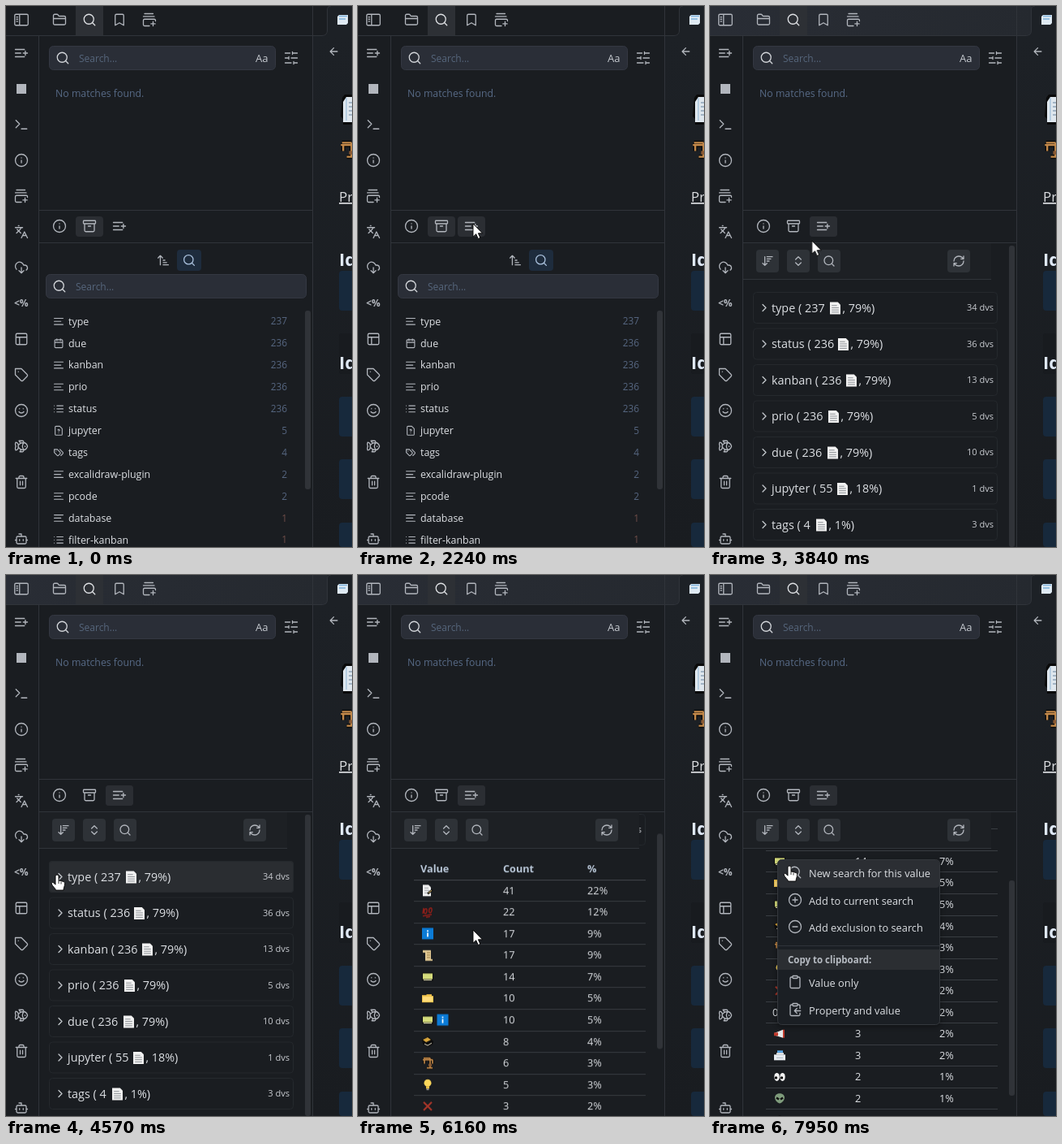
Write an HTML page that moves like this. It is 427 by 666 pixels and loops after 8000 ms.

```html
<!DOCTYPE html>
<html lang="en">
<head>
<meta charset="utf-8">
<title>Better Properties</title>
<style>
html, body { margin: 0; width: 100%; height: 100%; overflow: hidden; background: #1a1d21; }
svg { display: block; }
text { font-family: "Open Sans", "Noto Sans", sans-serif; white-space: pre; }
.i { fill: none; stroke-linecap: round; stroke-linejoin: round; }

.step, .ease { animation: 8s infinite; animation-delay: -10ms; }
.step { animation-timing-function: step-end; }
.ease { animation-timing-function: linear; }

#focus { animation-name: focus; }
#ribbonHover { animation-name: ribbonHover; }
#tip1 { animation-name: tip1; }
#tabHover { animation-name: tabHover; }
#tip2 { animation-name: tip2; }
#oldPane { animation-name: oldPane; }
#newPane { animation-name: newPane; }
#cards { animation-name: cards; }
#cardHover { animation-name: cardHover; }
#table { animation-name: tableOn; }
#scroll { animation-name: scroll; }
#thumb { animation-name: thumb; }
#click1 { animation-name: click1; }
#click2 { animation-name: click2; }
#menu { animation-name: menu; }
#itemHover { animation-name: itemHover; }
#pointer { animation-name: move; }
#arrow { animation-name: arrow; }
#hand { animation-name: hand; }

@keyframes focus { 0% { opacity: 0 } 40.5%, 100% { opacity: 1 } }
@keyframes ribbonHover { 0%, 9.4% { opacity: 0 } 10.6%, 20.6% { opacity: 1 } 21.4%, 100% { opacity: 0 } }
@keyframes tip1 { 0%, 11.6% { opacity: 0 } 14.6%, 20.6% { opacity: 1 } 21%, 100% { opacity: 0 } }
@keyframes tabHover { 0% { opacity: 0 } 25.4%, 100% { opacity: 1 } }
@keyframes tip2 { 0%, 29.8% { opacity: 0 } 32.8%, 41.37% { opacity: 1 } 41.38%, 100% { opacity: 0 } }
@keyframes oldPane { 0% { opacity: 1 } 41.375%, 100% { opacity: 0 } }
@keyframes newPane { 0% { opacity: 0 } 41.375%, 100% { opacity: 1 } }
@keyframes cards { 0% { opacity: 1 } 65.375%, 100% { opacity: 0 } }
@keyframes cardHover { 0% { opacity: 0 } 53% { opacity: 1 } 69.4%, 100% { opacity: 0 } }
@keyframes tableOn { 0% { opacity: 0 } 65.375%, 100% { opacity: 1 } }
@keyframes scroll {
  0%, 75.2% { transform: none; animation-timing-function: ease-in-out }
  80.4%, 100% { transform: translateY(-200px) }
}
@keyframes thumb {
  0%, 75.2% { transform: none; animation-timing-function: ease-in-out }
  80.4%, 100% { transform: translateY(81px) }
}
@keyframes click1 { 0% { opacity: 0 } 40.5% { opacity: 1 } 41.375%, 100% { opacity: 0 } }
@keyframes click2 { 0% { opacity: 0 } 64.5% { opacity: 1 } 65.375%, 100% { opacity: 0 } }
@keyframes menu { 0% { opacity: 0 } 92.75%, 100% { opacity: 1 } }
@keyframes itemHover { 0% { opacity: 0 } 98.5%, 100% { opacity: 1 } }
@keyframes arrow { 0% { opacity: 1 } 56.25% { opacity: 0 } 69.4% { opacity: 1 } 98.5%, 100% { opacity: 0 } }
@keyframes hand { 0% { opacity: 0 } 56.25% { opacity: 1 } 69.4% { opacity: 0 } 98.5%, 100% { opacity: 1 } }
@keyframes move {
  0%, 1.3% { transform: translate(432px, 668px); animation-timing-function: ease-out }
  10.6%, 20.3% { transform: translate(22px, 63px); animation-timing-function: ease-in-out }
  26.2%, 27.95% { transform: translate(142px, 266px) }
  28%, 45.2% { transform: translate(142px, 268px); animation-timing-function: ease-in-out }
  54.6%, 56.2% { transform: translate(62px, 371px) }
  56.25%, 59.6% { transform: translate(63px, 369px) }
  59.65%, 67.4% { transform: translate(62px, 369px); animation-timing-function: ease-in-out }
  72.7%, 80.4% { transform: translate(142px, 437px) }
  82.8% { transform: translate(113px, 401px) }
  84.9% { transform: translate(89px, 369px); animation-timing-function: ease-out }
  87%, 98.2% { transform: translate(82px, 350px) }
  99.3%, 100% { transform: translate(98px, 358px) }
}
</style>
</head>
<body>
<svg id="stage" width="427" height="666" viewBox="0 0 427 666"></svg>
<script>
const box = (x, y, w, h) =>
  `M${x + 2} ${y}h${w - 4}a2 2 0 0 1 2 2v${h - 4}a2 2 0 0 1-2 2h${4 - w}a2 2 0 0 1-2-2v${4 - h}a2 2 0 0 1 2-2Z`;
const ring = 'M22 12a10 10 0 1 1-20 0 10 10 0 0 1 20 0Z';
const clip = 'M9 2h6a1 1 0 0 1 1 1v2a1 1 0 0 1-1 1H9a1 1 0 0 1-1-1V3a1 1 0 0 1 1-1Z';

const paths = {
  sidebar: box(1, 3, 22, 18) + 'M9 3v18M4 7.5h2M4 11h2M4 14.5h2',
  folder: 'M20 20a2 2 0 0 0 2-2V8a2 2 0 0 0-2-2h-7.9a2 2 0 0 1-1.7-.9l-.8-1.2A2 2 0 0 0 7.9 3H4a2 2 0 0 0-2 2v13a2 2 0 0 0 2 2ZM2 10h20',
  search: 'M19 11a8 8 0 1 1-16 0 8 8 0 0 1 16 0ZM21 21l-4.3-4.3',
  bookmark: 'm19 21-7-4-7 4V5a2 2 0 0 1 2-2h10a2 2 0 0 1 2 2Z',
  stack: 'M4 2h14M2 6.5h18M12 22H4a2 2 0 0 1-2-2v-7a2 2 0 0 1 2-2h16a2 2 0 0 1 2 2v1M18 15v7M14.5 18.5h7',
  listPlus: 'M11 12H2M17 6H2M17 18H2M18.5 8.5v7M22 12h-7',
  terminal: 'm3 17 6-6-6-6M12 19h9',
  info: ring + 'M12 16v-4M12 8h.01',
  languages: 'm5 8 6 6M4 14l6-6 2-3M2 5h12M7 2h1M22 22l-5-10-5 10M14 18h6',
  cloud: 'M4 14.9A7 7 0 1 1 15.7 8h1.8a4.5 4.5 0 0 1 2.5 8.2M12 12v9M8 17l4 4 4-4',
  layout: box(3, 3, 18, 18) + 'M3 9h18M9 21V9',
  tag: 'M12 2H2v10l9.3 9.3c.9.9 2.5.9 3.4 0l6.6-6.6c.9-.9.9-2.5 0-3.4ZM7 7h.01',
  smile: ring + 'M8 14s1.5 2 4 2 4-2 4-2M9 9h.01M15 9h.01',
  fish: 'M6.5 12c.9-3.5 4.9-6 8.5-6s6.1 2.5 7 6c-.9 3.5-3.4 6-7 6s-7.6-2.5-8.5-6ZM18 12v.5M16 18a9.8 9.8 0 0 1 0-12M7 10.7C7 8 5.6 6 2.7 5.5c-1 1.5-1 5 .2 6.5-1.2 1.5-1.2 5-.2 6.5C5.6 18 7 16 7 13.3M10.5 7.3C10.2 5.9 9.2 4.2 8 3h5.8a2 2 0 0 1 2 1.7l.2 1.4M16 18l-.2 1.3a2 2 0 0 1-2 1.7H9.5a6 6 0 0 0 1.5-4',
  trash: 'M3 6h18M19 6v14a2 2 0 0 1-2 2H7a2 2 0 0 1-2-2V6M8 6V4a2 2 0 0 1 2-2h4a2 2 0 0 1 2 2v2M10 11v6M14 11v6',
  bot: 'M12 8V4H8' + box(4, 8, 16, 12) + 'M2 14h2M20 14h2M15 13v2M9 13v2',
  sliders: 'M22 4h-8M10 4H2M22 12H12M8 12H2M22 20h-6M12 20H2M14 2v4M8 10v4M16 18v4',
  archive: 'M3 3h18a1 1 0 0 1 1 1v3a1 1 0 0 1-1 1H3a1 1 0 0 1-1-1V4a1 1 0 0 1 1-1ZM4 8v11a2 2 0 0 0 2 2h12a2 2 0 0 0 2-2V8M10 12h4',
  sortUp: 'm3 8 4-4 4 4M7 4v16M12 12h3M12 16h6M12 20h9',
  sortDown: 'm3 16 4 4 4-4M7 20V4M11 4h10M11 8h7M11 12h4',
  updown: 'm7 15 5 5 5-5M7 9l5-5 5 5',
  refresh: 'M3 12a9 9 0 0 1 9-9 9.8 9.8 0 0 1 6.7 2.7L21 8M21 3v5h-5M21 12a9 9 0 0 1-9 9 9.8 9.8 0 0 1-6.7-2.7L3 16M8 16H3v5',
  back: 'm12 19-7-7 7-7M19 12H5',
  text: 'M22 5H2M17 12H2M22 19H2',
  calendar: box(3, 4, 18, 18) + 'M16 2v4M8 2v4M3 10h18',
  list: 'M8 5h14M8 12h14M8 19h14M2 5h.01M2 12h.01M2 19h.01',
  question: 'M14.5 2H6a2 2 0 0 0-2 2v16a2 2 0 0 0 2 2h12a2 2 0 0 0 2-2V7.5ZM10 10.3c1-2 4-1.4 4 .7 0 1.3-2 2-2 2M12 17h.01',
  tags: 'M9 5H2v7l6.3 6.3c.9.9 2.5.9 3.4 0l3.6-3.6c.9-.9.9-2.5 0-3.4ZM6 9h.01M15 5l6.3 6.3a2.4 2.4 0 0 1 0 3.4L17 19',
  right: 'm9 18 6-6-6-6',
  down: 'm6 9 6 6 6-6',
  plus: ring + 'M8 12h8M12 8v8',
  minus: ring + 'M8 12h8',
  clip: clip + 'M16 4h2a2 2 0 0 1 2 2v14a2 2 0 0 1-2 2H6a2 2 0 0 1-2-2V6a2 2 0 0 1 2-2h2',
  clipIn: clip + 'M16 4h2a2 2 0 0 1 2 2v4M20 18v2a2 2 0 0 1-2 2H6a2 2 0 0 1-2-2V6a2 2 0 0 1 2-2h2M21 14H11M15 10l-4 4 4 4'
};

// small colour pictures, about 14 px wide, centred on 0,0
const crane = 'M-6-4H6M-5-6H3M-4-4V1M3-6V6M6-4V1M-1 6H6';
const pics = {
  page: '<path d="M-6-7H3L6-4V7H-6Z" fill="#f1f1f1"/><path d="M-4-3H2M-4-.5H4M-4 2H4M-4 4.5H4" stroke="#8b8f94" stroke-width=".9"/>',
  memo: '<path d="M-6-7H1L4-4V7H-6Z" fill="#f1f1f1"/><path d="M-4-3H1M-4 0H2M-4 3H2" stroke="#9a9da1"/><path d="M0 4 6-1" stroke="#111" stroke-width="2.5"/><path d="M1 3 5 0" stroke="#d8b45a"/>',
  hundred: '<g fill="none" stroke="#8f1f1a" stroke-width="1.5"><path d="M-5-5-6 2M-2-4c-3 0-3 6-1 6s3-6 1-6ZM4-5c-3 0-3 6-1 6s3-6 1-6ZM-6 5 5 3M-2 6.5 3 5.5"/></g>',
  info: '<path d="M-7-7H7V7H-7Z" fill="#0b7bd6"/><path d="M0-4v1.8M0-1V4" stroke="#fff" stroke-width="1.7"/>',
  scroll: '<path d="M-6-6H4V5H6V7H-3V-3H-6Z" fill="#e0c793"/><path d="M-1-3H3M-1 0H3M-1 3H3" stroke="#9a7c45"/>',
  card: '<path d="M-7-5H7V5H-7Z" fill="#111"/><path d="M-6-4H6V3H-6Z" fill="#d5dc7c"/><path d="M-5 4H5" stroke="#e9e5b8"/>',
  folder: '<path d="M-7-4H-2L-1-5H5V-3H7V5H-7Z" fill="#f0c24b"/><path d="M-6-2H6V4H-6Z" fill="#ffdc7a"/>',
  box: '<path d="M-7-2 1-6 7 0 6 4 0 7-6 3Z" fill="#0d0d0d"/><path d="M-6-2 0-5 4-2-2 1Z" fill="#d9a63c"/><path d="M-4 3 0 5 5 2" fill="none" stroke="#e8e0c8"/>',
  crane: `<path d="${crane}" fill="none" stroke="#0a0a0a" stroke-width="3.4"/><path d="${crane}" fill="none" stroke="#c58a4a" stroke-width="1.6"/><path d="M1 1H5V4H1Z" fill="#8a5a33"/>`,
  bulb: '<circle cy="-2" r="4.5" fill="#fbd75b"/><path d="M-2 2H2V5H-2Z" fill="#e8c04a"/><path d="M-1.5 6H1.5" stroke="#aaa" stroke-width="1.5"/>',
  cross: '<path d="M-5-5 5 5M5-5-5 5" stroke="#a8362a" stroke-width="2.2"/>',
  horn: '<path d="M-6-1 4-5V5L-6 2Z" fill="#e9e9e9"/><path d="M-7-1.5H-2V2.5H-7Z" fill="#c0392b"/><path d="M5-5V5" stroke="#c0392b" stroke-width="2"/>',
  cards: '<path d="M-7-1H7V6H-7Z" fill="#e8edf2"/><path d="M-3-6H4V-3H-3Z" fill="#5aa7e6"/><path d="M-4-2H5" stroke="#fff" stroke-width="2"/><path d="M-4 3H4" stroke="#aab4be"/>',
  eyes: '<g fill="#f4f4f4"><ellipse cx="-3.5" rx="3.2" ry="5"/><ellipse cx="3.5" rx="3.2" ry="5"/></g><circle cx="-4.5" cy="1" r="1.7"/><circle cx="2.5" cy="1" r="1.7"/>',
  alien: '<path d="M0 6C-4 5-6 1-6-1-6-8 6-8 6-1 6 1 4 5 0 6Z" fill="#7f9c7c"/><path d="M-4-1-1 1M4-1 1 1" stroke="#111" stroke-width="2.5"/>',
  hat: '<path d="M-6 2V-3Q0-8 6-3V2Z" fill="#050505"/>'
};

const rect = (x, y, w, h, fill, r = 0, more = '') =>
  `<rect x="${x}" y="${y}" width="${w}" height="${h}" rx="${r}" fill="${fill}" ${more}/>`;
const hline = (x1, x2, y, c = '#30343a') => rect(x1, y, x2 - x1, 1, c);
const icon = (name, cx, cy, size = 18, c = '#b2b6bd', w = 1.3) =>
  `<path class="i" transform="translate(${cx - size / 2} ${cy - size / 2}) scale(${size / 24})" d="${paths[name]}" stroke="${c}" stroke-width="${w * 24 / size}"/>`;
const pic = (name, x, y, s = 1) => `<g transform="translate(${x} ${y}) scale(${s})">${pics[name]}</g>`;
// y is the middle of the capitals
const text = (x, y, s, size = 12.45, fill = '#dcdfe3', more = '') =>
  `<text x="${x}" y="${Math.round(y + size * .35)}" font-size="${size}" fill="${fill}" ${more}>${s}</text>`;
const END = 'text-anchor="end"', BOLD = 'font-weight="700"';
const group = (id, kind, body) => `<g id="${id}" class="${kind}">${body}</g>`;

const searchBox = (x, y, w) =>
  rect(x + .5, y + .5, w - 1, 29, '#2a2e37', 5, 'stroke="#343842"') +
  icon('search', x + 17, y + 15, 18, '#d3d6da') + text(x + 37, y + 16, 'Search...', 12, '#56667c');

const ribbon = ['listPlus', '', 'terminal', 'info', 'stack', 'languages', 'cloud', '', 'layout', 'tag', 'smile', 'fish', 'trash']
  .map((n, i) => n && icon(n, 19, 58 + 44 * i)).join('') +
  rect(13, 96, 12, 12, '#b2b6bd') +
  text(10, 366, '&lt;%', 12, '#b2b6bd', BOLD) + icon('bot', 19, 656);

const topBar = rect(86, 0, 34, 36, '#2d3035') +
  ['folder', 'search', 'bookmark', 'stack'].map((n, i) => icon(n, 66 + 37 * i, 17, 18, i == 1 ? '#dfe1e4' : '#b2b6bd')).join('') +
  icon('sidebar', 19, 17);

const editor = rect(379, 37, 48, 629, 'url(#edit)') +
  '<path d="M390 37Q397 37 397 30V5Q397 0 402 0H427V37Z" fill="#1d2126"/>' +
  '<path d="M379 36.5H390Q396.5 36.5 396.5 30V5Q396.5 0 401 0" fill="none" stroke="#30343a"/>' +
  '<path d="M409 13 411 11H422V21L420 23H409Z" fill="#dfeaf3"/><path d="M411 12.5H421M411 16H419" stroke="#7fb2dc" stroke-width="1.5"/>' +
  icon('back', 404.5, 56, 15) +
  '<path d="M415 113 418 109H427V146H416V139L413 136Z" fill="#0a0a0a"/>' +
  '<path d="M416 118 420 112H427V143H416Z" fill="#dfe7ee"/><path d="M420 113V141" stroke="#8fb4d3"/><path d="M423 119H427M423 124H427M423 129H427M423 134H427" stroke="#8ea4b8" stroke-width="1.5"/>' +
  pic('crane', 422, 177, 1.45) +
  text(411, 235, 'Pr', 17, '#dcdee1', 'text-decoration="underline"') +
  rect(411, 403, 16, 50, '#181b1f', 3) +
  [[326, 49], [481, 49], [558, 49], [636, 30]].map(([y, h]) => rect(411, y, 20, h, '#17293c', 4)).join('') +
  [312, 439].map(y => text(411, y + .5, 'Id', 22, '#dfe8f5', BOLD)).join('');

const props = [['text', 'type', 237], ['calendar', 'due', 236], ['text', 'kanban', 236], ['text', 'prio', 236],
  ['list', 'status', 236], ['question', 'jupyter', 5], ['tags', 'tags', 4], ['text', 'excalidraw-plugin', 2],
  ['text', 'pcode', 2], ['text', 'database', 1], ['list', 'filter-kanban', 1]];
const oldPane = rect(86, 259, 34, 25, '#2b2e33', 4) +
  icon('sortUp', 194, 313, 17) + rect(211, 300, 30, 26, '#1e2c3d', 4) + icon('search', 226, 313, 17, '#a9c0dc') +
  searchBox(49, 330, 322) + rect(369, 375, 7, 220, '#303338', 3) +
  props.map(([ic, name, n], i) => {
    const y = 388.3 + 26.9 * i;
    return icon(ic, 65, y, 13, '#b2b6bd', 1.1) + text(77, y, name) +
      text(347, y, n, 11.8, n == 1 ? '#6f4d49' : '#566680', END);
  }).join('');

const card = (i, name, n, px, pct, dvs, chevron = 'right') => {
  const y = 371.5 + 44.5 * i;
  return rect(53.5, y - 19, 301, 38, 'none', 4, 'stroke="#25292d"') + icon(chevron, 67, y, 16, '#c3c7cc') +
    text(76, y, `${name} ( ${n}`, 14.4) + pic('page', px + 7.5, y + .5, 1.08) +
    text(px + 16.5, y, `, ${pct}%)`, 14.4) + text(350, y, dvs + ' dvs', 11, '#c9ccd1', END);
};
const cards = [['type', 237, 147, 79, 34], ['status', 236, 157, 79, 36], ['kanban', 236, 167, 79, 13],
  ['prio', 236, 145, 79, 5], ['due', 236, 144, 79, 10], ['jupyter', 55, 156, 18, 1], ['tags', 4, 130, 1, 3]];

const rows = [['memo', 41, 22], ['hundred', 22, 12], ['info', 17, 9], ['scroll', 17, 9], ['card', 14, 7], ['folder', 10, 5],
  ['card info', 10, 5], ['box', 8, 4], ['crane', 6, 3], ['bulb', 5, 3], ['cross', 3, 2], ['', 3, 2], ['horn', 3, 2],
  ['cards', 3, 2], ['eyes', 2, 1], ['alien', 2, 1], ['hat', 2, 1]];
const table = card(0, ...cards[0], 'down') +
  ['Value', 'Count', '%'].map((s, i) => text([77, 179, 283][i], 420, s, 12.7, '#b9c7d8', BOLD)).join('') + hline(69, 355, 433, '#44484d') +
  rows.map(([names, n, pct], i) => {
    const y = 446.2 + 26.55 * i;
    const value = names ? names.split(' ').map((p, k) => pic(p, 86 + 18.5 * k, y)).join('') : text(77, y, '00v', 12.8);
    return value + text(179, y, n, 12.8) + text(283, y, pct + '%', 12.8) + hline(69, 355, Math.round(y + 13), '#393d42');
  }).join('');

const toolbar = rect(41, 292, 306, 44, '#1d2024') + hline(41, 347, 336) +
  [['sortDown', 71], ['updown', 109], ['search', 147], ['refresh', 307]].map(([n, x]) =>
    rect(x - 14, 300, 28, 28, '#2e3237', 4) + icon(n, x, 314, 16)).join('');

const newPane = rect(123, 259, 34, 25, '#2b2e33', 4) +
  '<g clip-path="url(#pane)">' +
  group('cardHover', 'step', rect(53, 352, 302, 39, '#2a2d31', 4)) +
  group('cards', 'step', cards.map((c, i) => card(i, ...c)).join('') + rect(369, 295, 7, 371, '#303338', 3)) +
  group('table', 'step', group('scroll', 'ease', table) + group('thumb', 'ease', rect(369, 295, 7, 265, '#303338', 3))) +
  '</g>' + toolbar;

const items = [['search', 'New search for this value', 368], ['plus', 'Add to current search', 402],
  ['minus', 'Add exclusion to search', 435], ['clip', 'Value only', 503], ['clipIn', 'Property and value', 537]];
const menu = rect(83.5, 350.5, 200, 203, '#1b1f24', 5, 'stroke="#34383d" filter="url(#shade)"') +
  group('itemHover', 'step', rect(84, 351, 199, 34, '#2b2e33', 4)) +
  hline(84, 283, 456) + rect(84, 461, 199, 25, '#2b2e32') +
  text(96, 474, 'Copy to clipboard:', 11.5, '#b6bbc2', BOLD) +
  items.map(([ic, s, y]) => icon(ic, 105, y - 2, 18) + text(122, y, s, 12.8)).join('');

const tip = (x, y, w, h, s, nib) => rect(x, y, w, h, '#090a0c', 4, 'filter="url(#shade)"') +
  `<path d="${nib}" fill="#090a0c"/>` + text(x + 8, y + h / 2, s, 10.8, '#f2f3f4', BOLD);
const ripple = (id, x, y) => group(id, 'step', `<circle cx="${x}" cy="${y}" r="12" fill="#f2e51c" opacity=".58"/>`);

const pointer =
  group('arrow', 'step', '<path d="M0 0V16.2L3.7 12.7 6.3 18.5 8.9 17.4 6.4 11.8H11.5Z" fill="#fff" stroke="#000" stroke-width=".9"/>') +
  group('hand', 'step', '<path d="M-2 2C-2-.5 2-.5 2 2V7l2 .3 4 1.2c1 .4 1.5 1 1.5 2.2 0 4-1.5 5-1.5 8.3H-1.5c-.5-2.5-4.500-5-5.3-8-.5-2 1.8-2.2 2.8-.8l2 2Z" fill="#fff" stroke="#000" stroke-width=".9"/><path d="M2 7v4M5 8.5v3" stroke="#000" stroke-width=".8"/>');

stage.innerHTML = `<defs>
  <linearGradient id="edit" x2="0" y2="1"><stop stop-color="#1d2126"/><stop offset="1" stop-color="#191c20"/></linearGradient>
  <linearGradient id="bar"><stop stop-color="#292d35"/><stop offset="1" stop-color="#25292f"/></linearGradient>
  <clipPath id="pane"><rect x="41" y="292" width="338" height="374"/></clipPath>
  <filter id="shade" color-interpolation-filters="sRGB"><feDropShadow dx="0" dy="2" stdDeviation="3" flood-opacity=".4"/></filter>
</defs>` +
  rect(0, 0, 427, 666, '#1a1d21') +
  group('focus', 'step', rect(0, 0, 397, 36, 'url(#bar)')) +
  topBar + hline(0, 390, 36) + rect(40, 37, 1, 629, '#30343a') + editor + rect(378, 0, 1, 666, '#30343a') +
  group('ribbonHover', 'ease', rect(4, 45, 30, 26, '#2b2e33', 4)) + ribbon +
  searchBox(53, 49, 280) + text(308, 64.5, 'Aa', 13, '#c5c9cf') + icon('sliders', 352, 64) +
  text(61, 107.5, 'No matches found.', 12.3, '#576a86') +
  hline(41, 378, 251) + hline(41, 378, 291) +
  group('tabHover', 'step', rect(123, 259, 34, 25, '#2b2e33', 4)) +
  group('oldPane', 'step', oldPane) + group('newPane', 'step', newPane) +
  ['info', 'archive', 'listPlus'].map((n, i) => icon(n, 66 + 37 * i, 271)).join('') +
  group('tip1', 'ease', tip(42, 46, 152, 24, 'Better Properties Lookup', 'M42 53 37 58 42 63Z')) +
  group('tip2', 'ease', tip(86, 292, 107, 24, 'Better Properties', 'M135 292 140 287 145 292Z')) +
  group('menu', 'step', menu) + ripple('click1', 142, 268) + ripple('click2', 62, 369) +
  group('pointer', 'ease', pointer);
</script>
</body>
</html>
```
